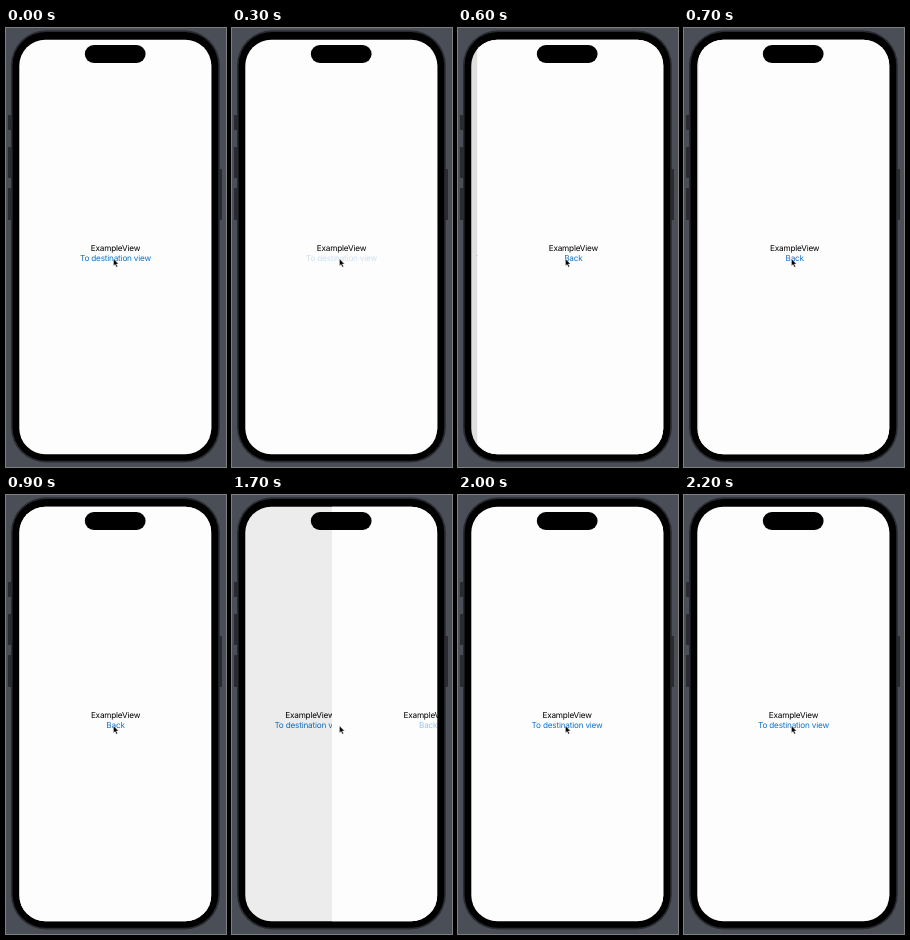
An HTML page for the animation above (2.7 s loop, 220x439 px).

```html
<!DOCTYPE html>
<html lang="en">
<head>
<meta charset="utf-8">
<title>Navigation push and pop</title>
<style>
  html, body { margin: 0; width: 100%; height: 100%; overflow: hidden; background: #4a4e57; }
  svg { display: block; width: 100%; height: 100%; }
  text {
    font: 8.2px Inter, "Liberation Sans", sans-serif;
    letter-spacing: -0.024em;
    text-anchor: middle;
    text-rendering: geometricPrecision;
  }
  .page { fill: #fdfdfd; }
  .link { fill: #0f74cc; }
  .metal { fill: #292b30; }
</style>
</head>
<body>
<svg viewBox="0 0 220 439">
  <defs>
    <clipPath id="screen"><rect x="13.3" y="11.7" width="192" height="414.5" rx="26"/></clipPath>
  </defs>

  <g class="metal">
    <rect x="2" y="87" width="5" height="15" rx="1"/>
    <rect x="2" y="119" width="5" height="31" rx="1"/>
    <rect x="2" y="160" width="5" height="32" rx="1"/>
    <rect x="211" y="141" width="5" height="51" rx="1"/>
    <rect x="5" y="2.3" width="208.8" height="432.2" rx="35"/>
  </g>
  <rect x="6.6" y="4" width="205.6" height="428.8" rx="33.4"/>

  <g clip-path="url(#screen)">
    <g id="home">
      <rect class="page" x="13" y="11" width="250" height="416"/>
      <text x="109.5" y="223.2">ExampleView</text>
      <text id="homeLink" class="link" x="109.5" y="233.2">To destination view</text>
    </g>
    <rect id="dim" x="13" y="11" width="193" height="416" opacity="0"/>
    <g id="detail">
      <rect class="page" x="13.3" y="11" width="193" height="416"/>
      <text x="109.5" y="223.2">ExampleView</text>
      <text id="backLink" class="link" x="109.5" y="233.2">Back</text>
    </g>
  </g>

  <rect x="78.8" y="17" width="60.8" height="18" rx="9"/>
  <path d="M107.4 230.8V238l1.7-1.5 1.2 2.7 1.3-.6-1.2-2.6h2.2z" stroke="#fff" stroke-width=".5"/>
</svg>

<script>
const LOOP = 2700, TICK = 100, WIDTH = 192;
const PUSH = 310, POP = 1617;
const PARALLAX = 0.3, SHADE = 0.12;

// Critically damped spring: the share of the way still to go.
const remaining = ms => {
  const z = Math.max(0, ms) * 0.0184;
  return (1 + z) * Math.exp(-z);
};
const cover = t => t < POP ? 1 - remaining(t - PUSH) : remaining(t - POP);
const shift = x => `translateX(${x.toFixed(3)}px)`;

const homePress = { 200: 0.4, 300: 0.2, 400: 0.45 };
const backPress = { 1700: 0.4, 1800: 0.8 };

function play(id, property, valueAt) {
  const frames = [];
  for (let t = 0; t <= LOOP; t += TICK) {
    frames.push({ offset: t / LOOP, easing: "steps(1, end)", [property]: valueAt(t) });
  }
  document.getElementById(id).animate(frames, { duration: LOOP, iterations: Infinity });
}

play("home", "transform", t => shift(-PARALLAX * WIDTH * cover(t)));
play("detail", "transform", t => shift(WIDTH * (1 - cover(t))));
play("dim", "opacity", t => SHADE * cover(t));
play("homeLink", "opacity", t => homePress[t] ?? 1);
play("backLink", "opacity", t => backPress[t] ?? 1);
</script>
</body>
</html>
```
